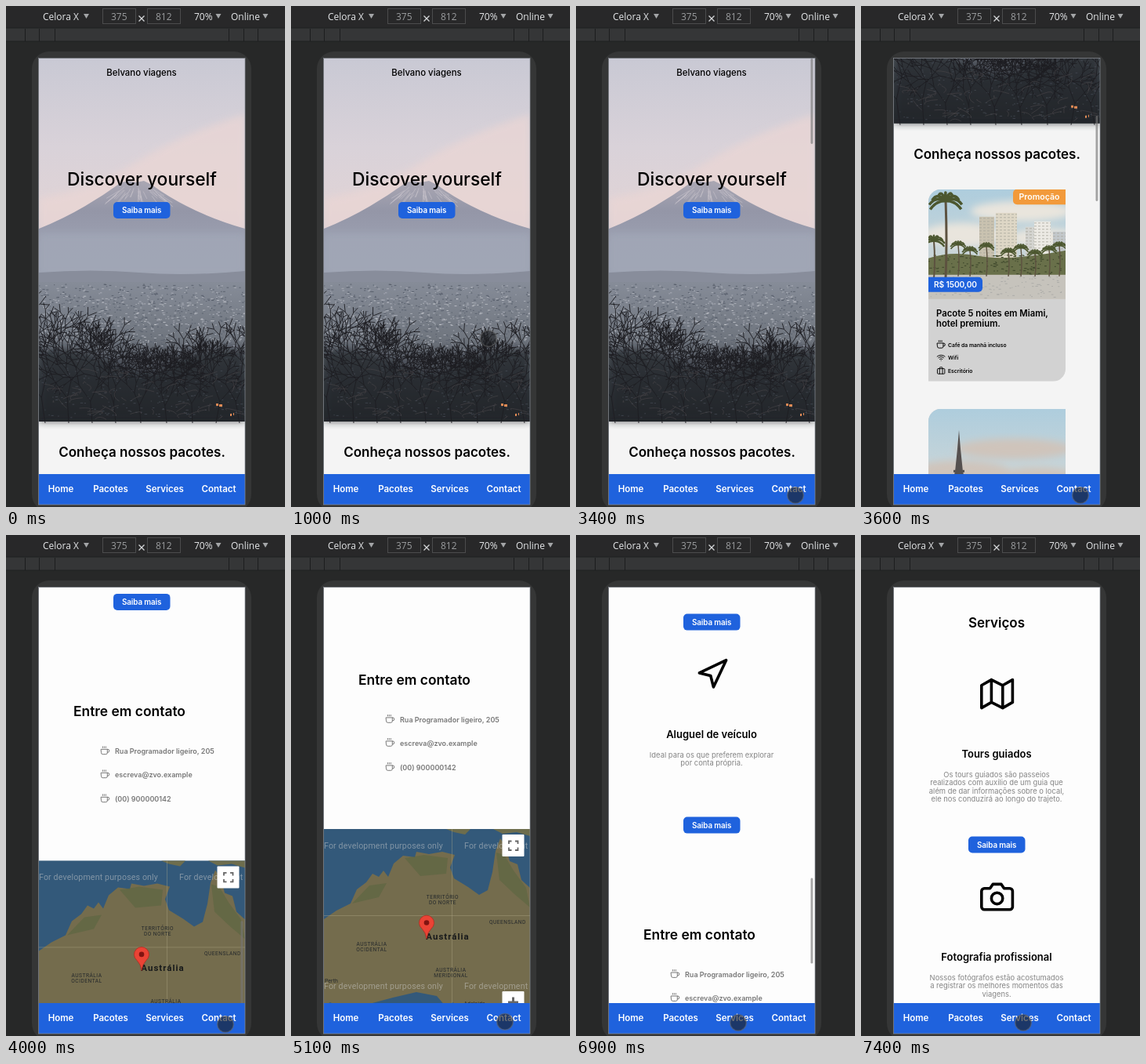
An HTML page that plays this animation: 356 by 639 pixels, repeating every 8 s.

```html
<!DOCTYPE html>
<html lang="pt">
<head>
<meta charset="utf-8">
<title>Página de viagens</title>
<style>
  html, body { margin: 0; width: 100%; height: 100%; overflow: hidden; background: #272828; }
  svg { display: block; width: 356px; height: 639px; }
  text { font-family: Inter, sans-serif; }
  .bar text { font-family: "Open Sans", "Noto Sans", sans-serif; }
  .map text { font-family: Roboto, sans-serif; }
  .icon { fill: none; stroke: #000; stroke-width: 2; stroke-linecap: round; stroke-linejoin: round; }
</style>
</head>
<body>
<svg id="stage" viewBox="0 0 356 639"></svg>
<script>
const BLUE = '#1f62dd';
const LOOP = 8000, STEP = 100;
const SERVICES = 1387, CONTACT = 2255;

let seed = 11;
const rnd = (a = 0, b = 1) => {
  seed = (seed * 16807) % 2147483647;
  return a + (b - a) * seed / 2147483647;
};
const repeat = (n, fn) => Array.from({ length: n }, (_, i) => fn(i)).join('');
const rect = (x, y, w, h, fill, rx = 0, more = '') =>
  `<rect x="${x}" y="${y}" width="${w}" height="${h}" fill="${fill}" rx="${rx}" ${more}/>`;
const shape = (d, fill, more = '') => `<path d="${d}" fill="${fill}" ${more}/>`;
const line = (d, stroke, width = 1, more = '') =>
  `<path d="${d}" fill="none" stroke="${stroke}" stroke-width="${width}" ${more}/>`;
const text = (x, y, str, size, { w = 600, fill = '#000', a = 'middle', ls = 0 } = {}) =>
  `<text x="${x}" y="${y}" font-size="${size}" font-weight="${w}" fill="${fill}" text-anchor="${a}" letter-spacing="${ls}">${str}</text>`;
const group = (dy, ...parts) => `<g transform="translate(0 ${dy})">${parts.join('')}</g>`;
const gradient = (id, ...stops) => `<linearGradient id="${id}" x2="0" y2="1">` +
  stops.map(([at, c]) => `<stop offset="${at}" stop-color="${c}"/>`).join('') + '</linearGradient>';

const ICONS = {
  map: 'M1 6V22L8 18L16 22L23 18V2L16 6L8 2ZM8 2V18M16 6V22',
  camera: 'M23 19a2 2 0 0 1-2 2H3a2 2 0 0 1-2-2V8a2 2 0 0 1 2-2h4l2-3h6l2 3h4a2 2 0 0 1 2 2zM16 13a4 4 0 1 1-8 0a4 4 0 1 1 8 0',
  arrow: 'M3 11L22 2L13 21L11 13Z',
  coffee: 'M18 8h1a4 4 0 0 1 0 8h-1M2 8h16v9a4 4 0 0 1-4 4H6a4 4 0 0 1-4-4zM6 1v3M10 1v3M14 1v3',
  wifi: 'M5 12.55a11 11 0 0 1 14.08 0M1.42 9a16 16 0 0 1 21.16 0M8.53 16.11a6 6 0 0 1 6.95 0M12 20h.01',
  case: 'M4 7H20a2 2 0 0 1 2 2V19a2 2 0 0 1-2 2H4a2 2 0 0 1-2-2V9a2 2 0 0 1 2-2M16 21V5a2 2 0 0 0-2-2h-4a2 2 0 0 0-2 2v16'
};
const icon = (name, x, y, scale, style = '') =>
  `<path class="icon" d="${ICONS[name]}" transform="translate(${x} ${y}) scale(${scale})" style="${style}"/>`;
const button = y => rect(137, y, 72.5, 21, BLUE, 5) +
  text(173.2, y + 14, 'Saiba mais', 9.8, { fill: '#fff', ls: -.1 });

// Short random dashes, used for roofs, windows and leaves.
const specks = (n, x0, x1, y0, y1, color, size = 1) => line(
  repeat(n, () => `M${rnd(x0, x1).toFixed(1)} ${rnd(y0, y1).toFixed(1)}h${rnd(1, 3.5).toFixed(1)}`), color, size);

function branch(x, y, angle, len, depth) {
  const x2 = x + Math.cos(angle) * len, y2 = y + Math.sin(angle) * len;
  const own = `M${x.toFixed(1)} ${y.toFixed(1)}L${x2.toFixed(1)} ${y2.toFixed(1)}`;
  if (!depth) return own;
  return own + repeat(2, i => branch(x2, y2, angle + (i ? 1 : -1) * rnd(.15, .65), len * rnd(.7, .95), depth - 1));
}

function hero() {
  const trunks = [[50, 25], [80, 24], [110, 20], [140, 17], [172, 15], [205, 14], [238, 17], [268, 20], [298, 20]];
  return [
    rect(42, 67, 263, 250, 'url(#sky)'),
    shape('M42 245Q110 235 165 200T305 138V300H42Z', '#ead6d4', 'opacity=".75" filter="url(#soft)"'),
    shape('M42 284Q95 263 147 225L157 223L166 225L176 223L186 228Q235 264 305 284V350H42Z', 'url(#mount)'),
    line(repeat(34, () => {
      const k = rnd(-1, 1), y = rnd(230, 243), x = 168 + k * (y - 212);
      return `M${x} ${y}l${k * 16} ${rnd(7, 15)}`;
    }), '#c9c4cc', 1, 'opacity=".6"'),
    rect(42, 290, 263, 54, '#a2a8b7', 0, 'opacity=".75" filter="url(#soft)"'),
    shape('M42 340Q110 335 170 340T305 338V362H42Z', '#888d9b'),
    rect(42, 352, 263, 178, 'url(#city)'),
    specks(620, 42, 304, 355, 450, '#5b626e'),
    specks(430, 42, 304, 356, 440, '#a8acb5'),
    specks(120, 42, 304, 370, 430, '#c8cbd0', .8),
    shape('M42 440Q90 432 135 456T210 458T305 440V530H42Z', '#24262b', 'opacity=".72" filter="url(#soft)"'),
    specks(260, 42, 304, 440, 525, '#454a53', .8),
    line(trunks.map(([x, len]) => branch(x, 532, -1.57 + rnd(-.2, .2), len + 8, 7)).join(''), '#1d1e22', .9),
    line(repeat(60, () => `M${rnd(42, 304)} ${rnd(465, 528)}q${rnd(-10, 10)} -5 ${rnd(-22, 22)} ${rnd(-14, 4)}`), '#4a474a', .6),
    shape('M268 507h3v3h-3zM272 508h4v3h-4zM286 520h2v3h-2zM290 519h1v3h-1z', '#e08a55'),
    text(173, 89, 'Belvano viagens', 11.4, { w: 500 }),
    text(173.5, 229, 'Discover yourself', 22.8, { w: 500 }),
    button(250)
  ].join('');
}

const palm = (x, y, h, size) => line(`M${x} ${y}q2 ${h / 2} 0 ${h}`, '#5d5240', size / 7) +
  line(repeat(9, i => {
    const a = -3.5 + i * .48, dx = Math.cos(a) * size, dy = Math.sin(a) * size * .6;
    return `M${x} ${y}q${dx * .6} ${dy - size * .25} ${dx} ${dy + size * .3}`;
  }), '#4c572f', size / 6);

const tower = (x, y, w, h, color) => rect(x, y, w, h, color) +
  line(repeat(Math.floor(h / 4), i => `M${x} ${y + 2 + i * 4}h${w}`), '#a9a79d', .8, 'stroke-dasharray="3 2"');

const clouds = () => `<g fill="#e9e5dd" filter="url(#soft)">
  <ellipse cx="205" cy="262" rx="65" ry="13"/><ellipse cx="130" cy="292" rx="52" ry="15"/><ellipse cx="235" cy="296" rx="45" ry="12"/></g>`;

const beach = () => [
  rect(86, 234, 175, 140, 'url(#day)'), clouds(),
  tower(151, 269, 19, 55, '#c9c2b0'), tower(172, 264, 27, 60, '#ded7c6'),
  tower(210, 282, 14, 42, '#d4d4d0'), tower(221, 275, 21, 50, '#eceae4'), tower(245, 288, 16, 36, '#c3c8cb'),
  shape('M86 322Q115 312 150 319T261 312V348H86Z', '#69704a'),
  specks(150, 86, 259, 318, 344, '#434c2f', 1.2),
  rect(86, 343, 175, 31, '#c6c3bc'),
  specks(110, 86, 259, 345, 373, '#a5a5a3', .8),
  ...[124, 139, 160, 188, 204, 222, 240, 253].map((x, i) => palm(x, 305 + i * 7 % 12, 40 - i * 7 % 12, 10)),
  palm(93, 300, 48, 14), palm(108, 249, 99, 21)
].join('');

const paris = () => [
  rect(86, 234, 175, 140, 'url(#day)'),
  `<g fill="#cfc4bb" filter="url(#soft)"><ellipse cx="195" cy="285" rx="75" ry="13"/><ellipse cx="125" cy="318" rx="70" ry="18"/><ellipse cx="225" cy="325" rx="60" ry="16"/></g>`,
  shape('M125 261L127 285L130 314L136 338L146 360H137Q125 338 113 360H104L114 338L120 314L123 285Z', '#55504f'),
  rect(118, 312, 14, 3, '#55504f'), rect(112, 336, 26, 3, '#55504f'),
  rect(86, 355, 175, 19, '#6d6f60')
].join('');

const shore = () => rect(86, 234, 175, 140, 'url(#day)') + clouds() +
  rect(86, 318, 175, 32, '#6d9bab') + rect(86, 350, 175, 24, '#cdbf9f');

function card(index, photo, place, promo) {
  const features = [['coffee', 'Café da manhã incluso'], ['wifi', 'Wifi'], ['case', 'Escritório']];
  return group(380 + index * 280, '<g clip-path="url(#card)">',
    rect(86, 234, 175, 246, '#d2d2d2'), photo(),
    promo ? shape('M199 234H261V253.500H199a5 5 0 0 1-5-5V239a5 5 0 0 1 5-5', '#f29a3b') +
      text(227.500, 247.500, 'Promoção', 10.6, { fill: '#fff' }) : '',
    shape('M86 346H150a5 5 0 0 1 5 5V360a5 5 0 0 1-5 5H86Z', BLUE),
    text(120.500, 359.500, 'R$ 1500,00', 10.2, { fill: '#fff', ls: -.1 }),
    text(96, 396, `Pacote 5 noites em ${place},`, 11.3, { a: 'start' }),
    text(96, 409, 'hotel premium.', 11.3, { a: 'start' }),
    ...features.map(([name, label], i) => icon(name, 96.5, 426.500 + i * 16.5, .47) +
      text(111, 435 + i * 16.4, label, 6.8, { a: 'start' })),
    '</g>');
}

const service = (index, name, title, lines) => group(index * 259,
  icon(name, 152, 181, 1.8),
  text(173, 284, title, 13),
  ...lines.map((s, i) => text(173, 309 + i * 10.3, s, 9.4, { w: 400, fill: '#858585' })),
  button(384.5));

function map() {
  const label = (x, y, str, a = 'middle') => text(x, y, str, 6.6, { w: 400, fill: '#25292c', ls: .5, a });
  const notice = (x, y) => text(x, y, 'For development purposes only', 10.6, { w: 400, fill: '#d0d0d0', a: 'start', ls: .15 });
  return ['<g class="map">',
    rect(42, 375, 263, 281, '#33597a'),
    shape(`M42 490L58 479L76 470L84 452L96 443L104 432L112 436L118 428L124 436L131 419L143 409L158 411L160 404L176 407L193 404L209 408
      L203 424L208 438L226 449L240 459L251 453L257 430L261 403L267 387L274 396L279 416L289 420L294 440L305 450
      V656H236L222 604L206 596L198 602L186 588L160 583L130 590L100 598L70 606L50 596L42 600Z`, '#746c4d'),
    shape('M198 375H229L222 382L208 379ZM258 375H305V384L288 379L270 381Z', '#6d6d4d'),
    shape('M145 412L170 408L200 412L198 432L165 435ZM262 405L272 408L284 428L300 450L305 475L285 458L266 440ZM78 470L100 447L122 444L112 462Z', '#58653f', 'opacity=".55"'),
    line('M205.500 375V656M42 485.500H305', '#b6ad8c', .8, 'opacity=".45"'),
    label(193.500, 464, 'TERRITÓRIO'), label(193.500, 471, 'DO NORTE'),
    label(253, 496, 'QUEENSLAND', 'start'),
    label(103, 524, 'AUSTRÁLIA'), label(103, 531, 'OCIDENTAL'),
    label(204, 557, 'AUSTRÁLIA'), label(204, 564, 'MERIDIONAL'),
    text(43, 571, 'Perth', 7, { w: 400, a: 'start', fill: '#25292c' }),
    text(234, 600, 'Adelaide', 7, { w: 400, fill: '#25292c' }),
    text(200, 516, 'Austrália', 11.5, { w: 700, fill: '#181a1b', ls: 1 }),
    '<g opacity=".5">', notice(42, 400), notice(221, 400), notice(42, 579), notice(221, 579), '</g>',
    shape('M173 515Q172 507 167 502A9.500 9.500 0 1 1 179 502Q174 507 173 515Z', '#ea4335', 'stroke="#b52a20" stroke-width=".8"'),
    '<circle cx="173" cy="494.500" r="3.300" fill="#811411"/>',
    rect(269.5, 382, 28, 28, '#fff', 1), rect(269.5, 582, 28, 57, '#fff', 1),
    line('M278 394V390.500H281.500M286 390.500H289.500V394M289.500 398.500V402H286M281.500 402H278V398.500', '#666', 1.8),
    line('M277 596H290M283.500 589.500V602.500', '#666', 3),
    '</g>'].join('');
}

const contactRow = (y, str) => icon('coffee', 120.5, y - 10, .49, 'stroke:#777') +
  text(139, y, str, 9, { fill: '#777', a: 'start' });

const page = () => [
  rect(42, 67, 263, 1400, '#f4f4f4'),
  rect(42, 1454, 263, 1500, '#fdfdfd'),
  hero(),
  text(173.500, 575, 'Conheça nossos pacotes.', 17),
  card(0, beach, 'Miami', true), card(1, paris, 'Paris'), card(2, shore, 'Natal'),
  group(SERVICES,
    text(173, 118, 'Serviços', 17),
    service(0, 'map', 'Tours guiados', ['Os tours guiados são passeios', 'realizados com auxílio de um guia que',
      'além de dar informações sobre o local,', 'ele nos conduzirá ao longo do trajeto.']),
    service(1, 'camera', 'Fotografia profissional', ['Nossos fotógrafos estão acostumados',
      'a registrar os melhores momentos das', 'viagens.']),
    service(2, 'arrow', 'Aluguel de veículo', ['Ideal para os que preferem explorar', 'por conta própria.'])),
  group(CONTACT,
    text(86, 191, 'Entre em contato', 17.4, { a: 'start' }),
    contactRow(239, 'Rua Programador ligeiro, 205'),
    contactRow(269, 'escreva@zvo.example'),
    contactRow(300, '(00) 900000142'),
    map())
].join('');

function toolbar() {
  const label = (x, str, fill = '#e4e6e8') => text(x, 18, str, 12, { w: 400, fill, a: 'start' });
  const field = (x, str) => rect(x + .5, 3.5, 42, 19, 'none', 0, 'stroke="#4b4c4d"') + label(x + 11, str, '#9a9c9e');
  return ['<g class="bar">',
    rect(0, 0, 356, 28, '#282829'), rect(0, 28, 356, 17, '#353637'),
    line('M0 28H356M0 45H356', '#1f2021'),
    line('M24.500 29V45M42.500 29V45M62.500 29V45M284.500 29V45M303.500 29V45M321.500 29V45', '#1c1d1e'),
    label(47, 'Celora X'), label(240, '70%'), label(287, 'Online'),
    field(123, '375'), field(180, '812'),
    line('M169.500 12.500l7 7m0-7l-7 7', '#d5d7d9', 1.3),
    shape('M99 10h7l-3.500 6zM267.500 10h7l-3.500 6zM327.500 10h7l-3.500 6z', '#a3a5a7'),
    '</g>'].join('');
}

const stage = document.getElementById('stage');
stage.innerHTML = [
  '<defs>',
  gradient('sky', [0, '#c9c9d4'], [.45, '#d9d2d9'], [.75, '#dfd3d6'], [1, '#cfc8d0']),
  gradient('mount', [0, '#aaa7b3'], [.3, '#9496a7'], [.6, '#9b9fb0'], [1, '#9ba1b0']),
  gradient('city', [0, '#868c98'], [.4, '#70767f'], [.7, '#3c4048'], [1, '#232429']),
  gradient('day', [0, '#aecddd'], [.6, '#c9d5d8'], [1, '#dedbd3']),
  '<filter id="soft"><feGaussianBlur stdDeviation="5"/></filter>',
  '<clipPath id="screen"><rect x="42" y="67" width="263" height="569"/></clipPath>',
  '<clipPath id="card"><path d="M86 250a16 16 0 0 1 16-16H261V463a16 16 0 0 1-16 16H86z"/></clipPath>',
  '</defs>',
  rect(0, 0, 356, 639, '#272828'), toolbar(),
  rect(33, 58, 280, 587, '#353636', 22),
  '<g clip-path="url(#screen)"><g id="page">', page(), '</g>',
  rect(299.5, 67, 2.8, 109, '#777', 1.4, 'id="thumb" opacity=".65"'),
  rect(42, 597, 263, 39, BLUE),
  ...[[70, 'Home'], [133.5, 'Pacotes'], [202.5, 'Services'], [271.5, 'Contact']]
    .map(([x, s]) => text(x, 620, s, 11.5, { fill: '#fff' })),
  '</g>',
  rect(41.5, 66.5, 263.5, 569.5, 'none', 0, 'stroke="#8b8f98" stroke-width=".7"'),
  '<circle id="touch" r="10.300" fill="#1c1d20" fill-opacity=".62" stroke="#666" stroke-opacity=".5" stroke-width="1.600"/>'
].join('');

const pageLayer = document.getElementById('page');
const thumb = document.getElementById('thumb');
const touch = document.getElementById('touch');

const TOUCH_PATH = [
  [400, 20, 11], [800, 282, 567], [1200, 222, 281], [1400, 222, 281], [2000, 287, 499],
  [2400, 287, 499], [2700, 299, 628], [2800, 299, 628], [3100, 280, 624],
  [5000, 280, 624], [5500, 245, 608], [5900, 207, 622], [LOOP, 207, 622]
];

const swing = (t, start, length) =>
  (1 - Math.cos(Math.PI * Math.min(1, Math.max(0, (t - start) / length)))) / 2;

const scrollAt = t => CONTACT * swing(t, 3433, 620) + (SERVICES - CONTACT) * swing(t, 6682, 520);

function touchAt(t) {
  const i = TOUCH_PATH.findIndex(p => p[0] > t);
  const [t0, x0, y0] = TOUCH_PATH[i - 1], [t1, x1, y1] = TOUCH_PATH[i];
  const k = (t - t0) / (t1 - t0);
  return [x0 + (x1 - x0) * k, y0 + (y1 - y0) * k];
}

function draw() {
  const t = Math.floor(performance.now() % LOOP / STEP) * STEP;
  const scroll = scrollAt(t);
  pageLayer.setAttribute('transform', `translate(0 ${-scroll.toFixed(1)})`);
  thumb.setAttribute('y', 67 + scroll * .192);
  const scrolling = (t >= 3400 && t < 4300) || (t >= 6700 && t < 7400);
  thumb.style.display = scrolling ? '' : 'none';
  touch.style.display = t < 400 ? 'none' : '';
  if (t >= 400) touch.setAttribute('transform', `translate(${touchAt(t)})`);
  requestAnimationFrame(draw);
}
draw();
</script>
</body>
</html>
```
